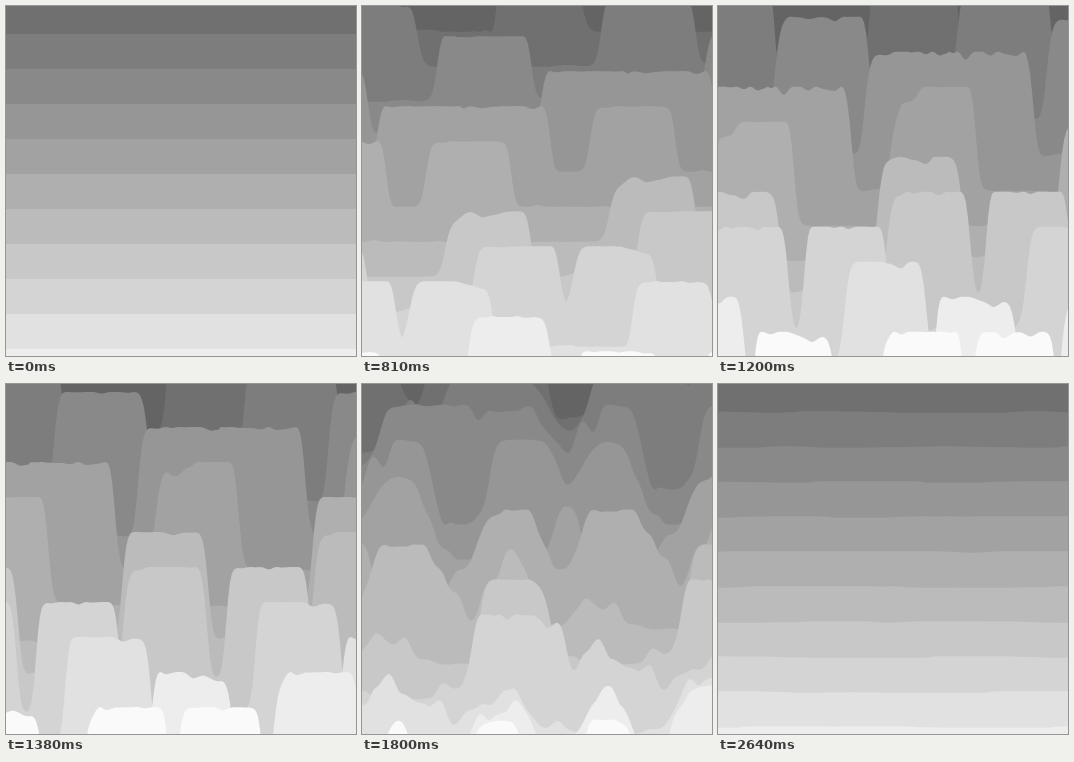
Recreate the animation shown at these times as an HTML page with a canvas. Size 350x350 px, loop 2.7 s.

```html
<!DOCTYPE html>
<html>
<head>
<meta charset="utf-8">
<title>Grey ridges</title>
<style>
  html, body { margin: 0; width: 100%; height: 100%; overflow: hidden; background: #636363; }
  canvas { display: block; width: 350px; height: 350px; }
</style>
</head>
<body>
<canvas id="stage" width="350" height="350"></canvas>
<script>
const SIZE = 350, LOOP = 2700, STEP = 30, GAP = 35, REACH = 55;
const ctx = document.getElementById('stage').getContext('2d');

// Centres of the broad hills along the one terrain that all layers share.
const hills = [16, 285, 555, 631, 760, 1111, 1300, 1404, 1625, 1900, 2022, 2115];

const mix = (a, b, v) => a + (b - a) * v;
const smooth = v => (v = Math.max(0, Math.min(1, v)), v * v * (3 - 2 * v));

function random(i, j) {
  const v = Math.sin(i * 127.1 + j * 311.7) * 43758.5453;
  return 2 * (v - Math.floor(v)) - 1;
}

// Smooth noise from -1 to 1.
function noise(x, y) {
  const i = Math.floor(x), j = Math.floor(y), u = smooth(x - i), v = smooth(y - j);
  return mix(mix(random(i, j), random(i + 1, j), u),
             mix(random(i, j + 1), random(i + 1, j + 1), u), v);
}

function hill(u) {
  const gap = Math.min(...hills.map(c => Math.abs(u - c)));
  return 2 * smooth((60 - gap) / 32) - 1;
}

// Broad hills dissolve into noise; the sine folds all crests to one level and notches them.
function relief(u, t) {
  const loose = smooth((t - 1380) / 600);
  const broad = noise(u / 52, t / 900), fine = noise(u / 13, t / 300 + 40);
  const form = mix(1.3 * hill(u) + .75 * broad, 2.3 * broad, loose);
  return Math.sin(1.75 * Math.tanh(form) + .42 * fine);
}

function swell(t) {
  if (t < 330) return 0;
  const wave = Math.sin(Math.PI * (t - 70) / 2630) ** 2;
  return Math.max(.8, REACH * wave * smooth((t - 270) / 300));
}

const grey = k => {
  const v = Math.round(124.5 + 12.5 * k);
  return `rgb(${v},${v},${v})`;
};

function draw(t) {
  const amp = swell(t), shift = 164 + .046 * (t - 810);
  ctx.fillStyle = grey(-2);
  ctx.fillRect(0, 0, SIZE, SIZE);
  for (let k = -1; k <= 10; k++) {
    const base = 28 + GAP * k;
    ctx.fillStyle = grey(k);
    ctx.beginPath();
    ctx.moveTo(0, SIZE + 2 * REACH);
    for (let x = 0; x <= SIZE; x += 2) {
      ctx.lineTo(x, amp ? base - amp * relief(x + shift * k, t) : base);
    }
    ctx.lineTo(SIZE, SIZE + 2 * REACH);
    ctx.fill();
  }
}

const start = performance.now();
let last = -1;
function tick() {
  const time = (performance.now() - start) % LOOP;
  const t = Math.min(Math.floor(time / STEP) * STEP, 2640);
  if (t !== last) draw(last = t);
  requestAnimationFrame(tick);
}
tick();
</script>
</body>
</html>
```
